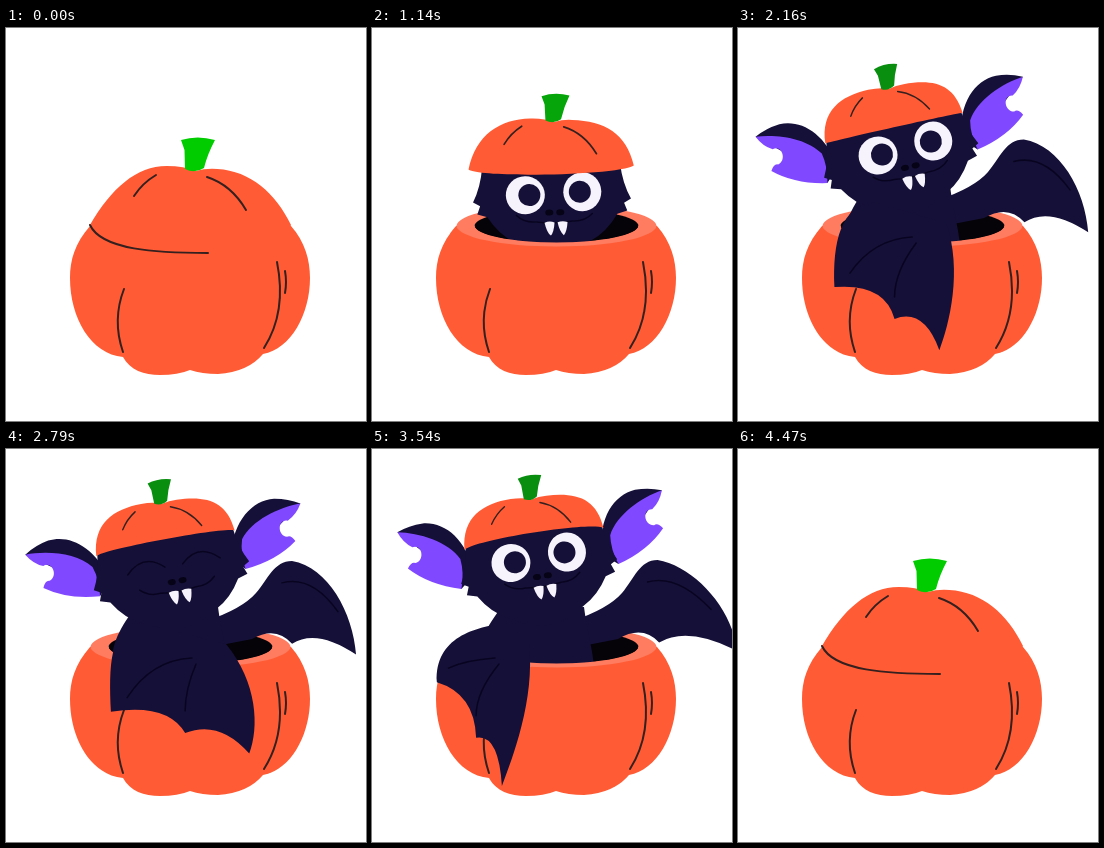
Write an HTML page that moves like this. It is 360 px wide and 393 px high and loops after 4.5 s.

```html
<!DOCTYPE html>
<html lang="en">
<head>
<meta charset="utf-8">
<title>Pumpkin bat</title>
<style>
html, body { margin: 0; width: 100%; height: 100%; overflow: hidden; background: #fff; }
svg { display: block; width: 100vw; height: 100vh; }
.skin { fill: #ff5c35; }
.rim { fill: #ff7c60; }
.bat { fill: #151038; }
.ear { fill: #8149ff; }
.white { fill: #f7f3fd; }
.line { fill: none; stroke: #35201f; stroke-width: 2; stroke-linecap: round; }
.rib { fill: none; stroke: #080420; stroke-width: 1.5; stroke-linecap: round; }
</style>
</head>
<body>
<svg viewBox="0 0 360 393">
  <defs>
    <g id="earShape" transform="translate(3 3)">
      <path class="bat" d="M60 22C66 -14 86 -32 108 -32Q122 -31 134 -25L100 5L74 36Z"/>
      <path class="ear" d="M134 -25C112 -23 84 -12 73 6Q70 20 74 36Q106 30 126 12Q122 5 118 7C108 5 110 -12 120 -9Q129 -14 134 -25Z"/>
    </g>
    <path id="tooth" class="white" d="M-5 -6Q0 -8 5 -6Q4 4 1 7Q-3 4 -5 -6Z"/>
  </defs>
  <ellipse class="rim" cx="184.5" cy="198" rx="100" ry="21"/>
  <ellipse cx="184.5" cy="198" rx="82" ry="17" fill="#050308"/>
  <g id="rightWing"><path id="rwShape" class="bat"/><path id="rwRib" class="rib"/></g>
  <path id="torso" class="bat" d="M128 160C112 182 104 198 106 222L222 222C222 204 216 188 212 158Z"/>
  <g id="head">
    <g id="ears">
      <g class="flap"><use href="#earShape"/></g>
      <g transform="scale(-1 1)"><g class="flap"><use href="#earShape"/></g></g>
    </g>
    <path class="bat" d="M-69 -2Q-71 18 -79 33L-72 37L-75 45L-65 48Q-54 66 -38 74Q0 100 38 74Q54 66 65 48L75 45L72 37L79 33Q71 18 69 -2Q0 -20 -69 -2Z"/>
    <g id="face">
      <g id="eyes">
        <ellipse class="white" cx="-28.5" cy="2" rx="19.5" ry="19"/>
        <ellipse class="white" cx="28.5" rx="19" ry="19.5"/>
        <g id="pupils"><circle class="bat" cx="-24.5" cy="2" r="11"/><circle class="bat" cx="26" r="11"/></g>
      </g>
      <path id="shut" class="rib" d="M-47 5Q-28 -14 -9 4M9 4Q28 -14 47 5"/>
      <path class="rib" d="M-38 22Q-30 30 -18 29Q0 32 18 29Q30 30 38 22"/>
      <ellipse cx="-5" cy="20" rx="4" ry="3" fill="#060316"/>
      <ellipse cx="6" cy="20" rx="4" ry="3" fill="#060316"/>
      <use href="#tooth" x="-5" y="36"/><use href="#tooth" x="8" y="36"/>
    </g>
  </g>
  <path class="skin" d="M84 198C69 215 64 232 64 250C64 290 85 326 117 329C124 342 138 347 154 347Q172 347 184 342Q196 346 212 346Q242 344 257 326C285 321 304 286 304 250C304 232 299 214 285 198L266.500 198A82 17 0 0 1 102.500 198Z"/>
  <path id="lip" class="rim" d="M84.500 197.500A100 21 0 0 0 284.500 197.500L266.500 197.500A82 17 0 0 1 102.500 197.500Z"/>
  <path class="line" d="M118 261Q106 292 117 324M271 234Q281 284 258 320M279 243Q281 254 279 265"/>
  <g id="leftWing"><path id="lwShape" class="bat"/><path id="lwRib" class="rib"/></g>
  <g id="lid">
    <path id="cap" class="skin"/>
    <path class="line" d="M-34.500 -50Q-48 -42 -56.500 -29M16.500 -48Q41 -40 55.500 -15"/>
    <path id="stem" d="M-9.500 -85Q7 -90 24.500 -85Q17 -71 13.500 -57Q4.500 -51 -5.500 -56L-6 -75Z"/>
    <path id="seam" class="line" d="M-100.500 0C-89 25 -34 28 17.500 28"/>
  </g>
</svg>
<script>
const LOOP = 4500, STEP = 30;
const SHOULDER = { x: 135, y: 180 };
const CLOSED = { x: 184.5, y: 197, turn: 0, size: 1, sag: 28 };
const PEEK = { x: 183, y: 172, turn: 0, size: .85, sag: 10 };
const OUTSIDE = { x: 162, y: 96, turn: -8, size: .7, sag: 0 };

const el = id => document.getElementById(id);
const set = (id, name, value) => el(id).setAttribute(name, value);
const show = (id, on) => set(id, 'visibility', on ? 'visible' : 'hidden');
const flaps = document.querySelectorAll('.flap');

const mix = (a, b, u) => a + (b - a) * u;

// Smooth step from 0 to 1 between two times.
function ramp(t, from, to) {
  const u = Math.min(1, Math.max(0, (t - from) / (to - from)));
  return u * u * (3 - 2 * u);
}

const hold = (t, a, b, c, d) => ramp(t, a, b) - ramp(t, c, d);

// Control point for a scalloped edge, pulled towards a joint.
function scallop(a, b, joint, pull) {
  return `${mix((a.x + b.x) / 2, joint.x, pull)} ${mix((a.y + b.y) / 2, joint.y, pull)}`;
}

function polar(angle, length) {
  const r = angle * Math.PI / 180;
  return { x: SHOULDER.x + length * Math.cos(r), y: SHOULDER.y + length * Math.sin(r) };
}

function grow(id, x, y, out) {
  set(id, 'transform', `translate(${x} ${y + (1 - out) * 20}) scale(${out}) translate(${-x} ${-y})`);
  show(id, out > .02);
}

// drop: 0 raised, 1 lowered; reach: extra stretch of the tip.
function drawRight(drop, reach, out) {
  const top = { x: mix(280, 286, drop), y: mix(97, 112, drop) };
  const notch = { x: mix(302, 286, drop), y: mix(173, 195, drop) };
  const tip = { x: mix(357, 350, drop) + reach, y: mix(147, 206, drop) };
  const pit = { x: 246, y: 190 };
  set('rwShape', 'd', `M200 172Q236 160 250 144C262 130 ${top.x - 18} ${top.y} ${top.x} ${top.y}`
    + `C${top.x + 36} ${top.y + 6} ${tip.x - 3} ${tip.y - 42} ${tip.x} ${tip.y}`
    + `Q${scallop(tip, notch, top, .24)} ${notch.x} ${notch.y}`
    + `Q${scallop(notch, pit, top, .2)} ${pit.x} ${pit.y}L205 198Z`);
  set('rwRib', 'd', `M${top.x - 10} ${top.y + 22}Q${top.x + 20} ${top.y + 14} `
    + `${(top.x + tip.x) / 2 + 14} ${(top.y + tip.y) / 2 + 4}`);
  grow('rightWing', 205, 185, out);
}

// The three wing points swing around the shoulder; fan opens them out.
function drawLeft(swing, fan, out) {
  const a = polar(110 + swing, 88);
  const b = polar(73 + swing - 6 * fan, 113);
  const c = polar(59 + swing - 10 * fan, 157 + 8 * fan);
  const pit = { x: mix(220, 157, Math.min(1, swing / 32)), y: 195 };
  set('lwShape', 'd', `M135 174C103 178 ${a.x - 2} ${a.y - 45} ${a.x} ${a.y}`
    + `Q${scallop(a, b, pit, .25)} ${b.x} ${b.y}`
    + `Q${scallop(b, c, pit, .24)} ${c.x} ${c.y}`
    + `C${c.x + 10} ${c.y - 26} ${(c.x + pit.x) / 2 + 20} ${(c.y + pit.y) / 2 - 16} ${pit.x} ${pit.y}Z`);
  const x = pit.x - 34, y = pit.y + 14;
  set('lwRib', 'd', `M${x} ${y}Q${(x + a.x) / 2} ${y + 2} ${mix(a.x, x, .2)} ${a.y - 14}`
    + `M${x + 4} ${y + 6}Q${b.x} ${(y + b.y) / 2 - 6} ${b.x} ${b.y - 22}`);
  grow('leftWing', 140, 185, out);
}

function drawLid(pose, lid) {
  const { size, sag } = lid, k = sag * 4 / 3, b = Math.min(1, (1 - size) / .28);
  set('lid', 'transform', `${pose} scale(${size} ${size + (1 - size) * .1})`);
  set('cap', 'd', `M-100.5 0C${-79 - 18 * b} ${-37 - 8 * b} ${-54 - 10 * b} -59 -24 -59`
    + `Q-6 -59 5 -54Q16 -57 27 -56`
    + `C${60 + 10 * b} -54 ${85 + 12 * b} ${-32 - 10 * b} 100.5 0C85 ${k} -85 ${k} -100.5 0Z`);
  set('stem', 'fill', `rgb(${10 * b},${204 - 62 * b},${16 * b})`);
  show('seam', size > .995);
  show('lip', size < .995);
}

function draw(t) {
  const peek = hold(t, 150, 330, 3700, 4110);
  const pop = hold(t, 1000, 1310, 3560, 3790);
  const out = hold(t, 1150, 1300, 3630, 3770);
  const nod = hold(t, 1650, 2160, 2160, 3300);
  const drift = ramp(t, 1770, 3500) * pop;
  const happy = hold(t, 2550, 2700, 2950, 3100);
  const leave = ramp(t, 3300, 3540);

  const lid = {};
  for (const key in CLOSED) {
    const share = key === 'y' ? pop : pop * pop;
    lid[key] = mix(mix(CLOSED[key], PEEK[key], peek), OUTSIDE[key], share);
  }
  lid.x -= 6 * nod;
  lid.y += 5 * nod - 6 * drift - 45 * Math.sin(Math.PI * ramp(t, 150, 540));
  lid.turn -= 4.5 * nod + drift;
  lid.sag -= 9 * drift;
  const pose = `translate(${lid.x} ${lid.y}) rotate(${lid.turn})`;

  const open = 1 - happy, lift = 5 * leave - 6 * happy;
  const look = -5 * Math.sin(2 * Math.PI * ramp(t, 570, 1080));
  set('head', 'transform', pose);
  set('face', 'transform', `translate(${2 + 5 * nod} ${25 - 7 * drift - 3 * nod})`);
  set('pupils', 'transform', `translate(${look} 0)`);
  set('eyes', 'transform', `scale(1 ${Math.max(open, .01)})`);
  show('eyes', open > .05);
  show('shut', open <= .05);
  show('ears', out > .02);
  flaps.forEach(f => f.setAttribute('transform',
    `translate(66 10) rotate(${-lift}) scale(${out}) translate(-66 -10)`));
  set('torso', 'transform', `translate(0 ${(1 - out) * 70})`);

  const flutter = Math.sin(Math.PI * (t - 2200) / 620) ** 2;
  drawRight(ramp(t, 1680, 2200) * (1 - .3 * flutter), 14 * leave, out);
  drawLeft(90 * (1 - hold(t, 1300, 1650, 3450, 3670)) + 6 * nod * open, happy, out);
  drawLid(pose, lid);
}

let start;
function tick(now) {
  if (start === undefined) start = now;
  draw(Math.floor((now - start) % LOOP / STEP) * STEP);
  requestAnimationFrame(tick);
}
draw(0);
requestAnimationFrame(tick);
</script>
</body>
</html>
```
